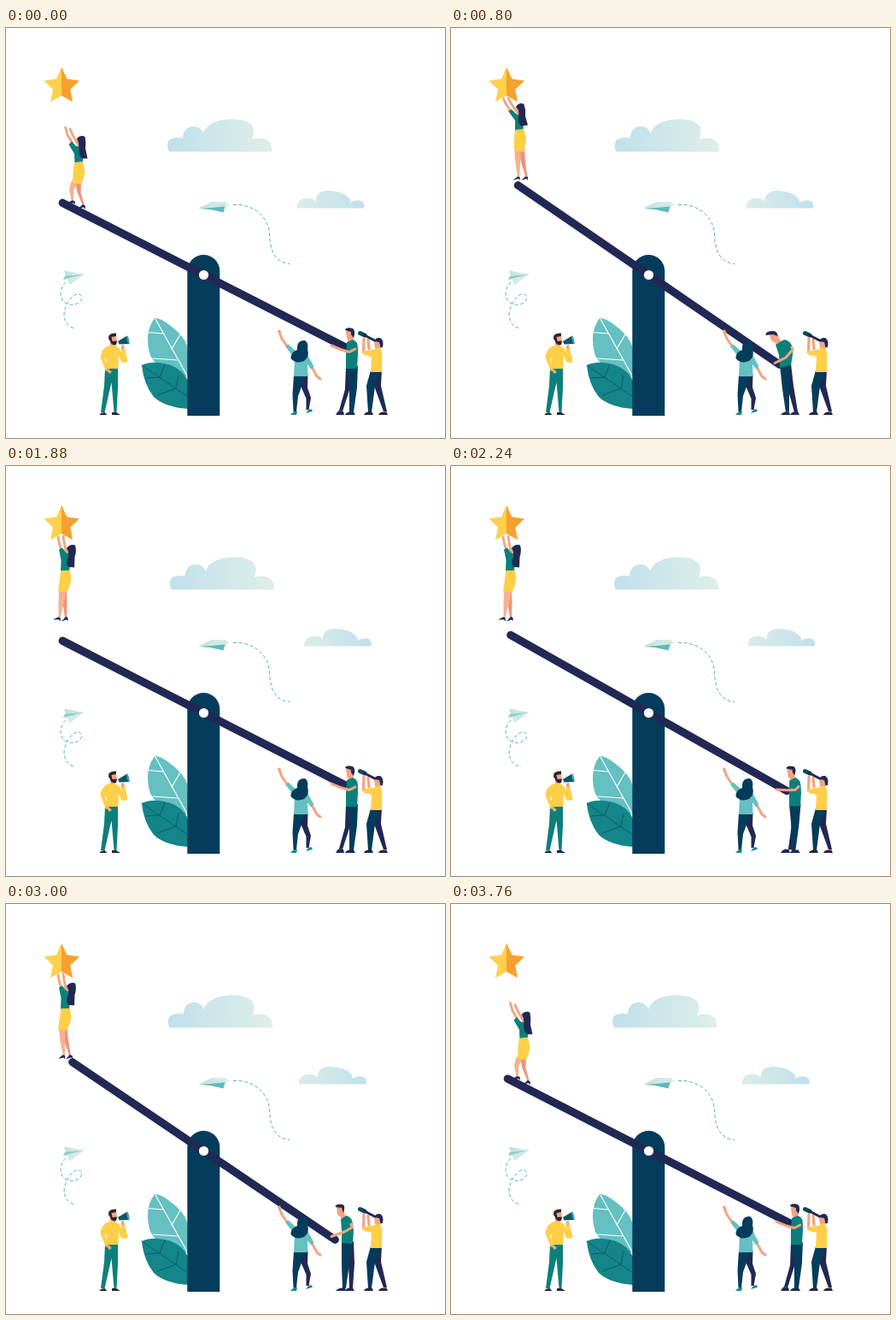
These frames come from a looping animation (514x479 px, 3800 ms). An HTML page:

```html
<!DOCTYPE html>
<html lang="en">
<head>
<meta charset="utf-8">
<title>Seesaw to the star</title>
<style>
html, body { margin: 0; width: 100%; height: 100%; overflow: hidden; background: #fff; }
svg { display: block; width: 100vw; height: 100vh; }
.line { fill: none; stroke-linecap: round; stroke-linejoin: round; }
.trail { fill: none; stroke: #55b7ba; stroke-width: 1; stroke-dasharray: 4 2.6; }
.navy { fill: #212854; } .deep { fill: #063c5b; } .green { fill: #0b807a; }
.aqua { fill: #64c0c1; } .gold { fill: #ffcf48; } .skin { fill: #f3a481; } .blush { fill: #f0927c; } .pale { fill: #f5b190; }
.dark { fill: #2d2432; }
.skinLine { stroke: #f3a481; }
</style>
</head>
<body>
<svg viewBox="0 0 514 479">
  <defs>
    <linearGradient id="sky"><stop stop-color="#c0e0eb"/><stop offset="1" stop-color="#dfeee8"/></linearGradient>
    <linearGradient id="sky2"><stop stop-color="#dbece8"/><stop offset="1" stop-color="#c0e0eb"/></linearGradient>
    <linearGradient id="wing"><stop stop-color="#b9dedf"/><stop offset="1" stop-color="#e6f1ec"/></linearGradient>
  </defs>

  <path id="cloud1" fill="url(#sky)" d="M191 144.500Q187 137 191 131Q197 126.500 207 128.500Q208 116 218 115Q228 114 231 123Q236 108 262 106.500Q289 106 290 120Q290 127 288 130Q303 126 309 134Q312 139 311 144.500Z"/>
  <path id="cloud2" fill="url(#sky2)" d="M340.300 210.500Q341 200 350 199Q359 198 362.500 203Q362 190 378 190Q396 191 402 199Q404 202 403 204Q411 199 418 203Q420 206 419.500 210.500Z"/>

  <path fill="#ffcf4e" d="M65 45.800L59 59.500L44.300 61.500L55 71.800L52 86.300L65 79Z"/>
  <path fill="#f7a02e" d="M65 45.800L71.300 59.500L86 61.500L75.300 71.800L78 86.300L65 79Z"/>

  <path fill="url(#wing)" d="M225.500 210.500L241 203L257 203L262 207L256 210L254 213Z"/>
  <path fill="#cfe7e5" d="M225.500 210.500L258 204L256 210Z"/>
  <path fill="#5dbabd" d="M226 211L240 210L256.500 208.500L254.500 215.500L239 212Z"/>
  <path class="trail" d="M266 206.500C289 205 307 220 308.500 240C309 259 314 274 332 275.500"/>

  <path fill="url(#wing)" d="M91.500 287.500L68 283.500L70 290L67 294L72 293L74.500 300Z"/>
  <path fill="#8accca" d="M91.500 287.500L69 290L67 294Z"/>
  <path fill="#d4e9e5" d="M91.500 287.500L71 293L74.500 300Z"/>
  <path class="trail" d="M70 297C62 304 61 320 74 323C85 325 92 316 87 311.500C80 307 69 322 68 334C68 344 73 350 82 351"/>

  <path class="aqua" d="M213 407Q181 404 169 383Q161 356 174 339Q182 338 200 354Q213 366 213 378Z"/>
  <path class="line" stroke="#fff" stroke-width="1.200" d="M175 340L212 406M184 357L166 355.500M204 358L194 375M201 388L172 386"/>
  <path fill="#148589" d="M159 394Q172 388 192 393.500Q208 400 213 412V445Q186 443 173 431Q161 416 159 394Z"/>
  <path class="line" stroke="#0a5f69" stroke-width="1" d="M159 394L213 431M180 408L186 393M180 408L164 409M199 421L202 406M199 421L177 429"/>

  <path class="deep" d="M212.300 453V284A19 19 0 0 1 250.300 284V453Z"/>
  <path id="beam" class="line" stroke="#212854" stroke-width="9.300" d="M46 288.500H417"/>
  <circle cx="231.500" cy="288.500" r="5.600" fill="#fff"/>

  <!-- man with megaphone -->
  <g>
    <path class="green" d="M116 397L131 397L131 420L129.500 449H126.500L123.500 414L115.500 449H111L115 418Z"/>
    <path class="dark" d="M109.500 452Q110 449.500 115.500 449L118.500 452ZM124 452V449H129L134 452Z"/>
    <path class="gold" d="M118 372L126 370L132 374L131.500 398H117L118 387L115.500 386L120 398L117 401L110.500 385Q111 376 118 372Z"/>
    <path class="line" stroke="#ffcf48" stroke-width="4.600" d="M131 376L137 388.500H140L137 376"/>
    <path class="skin" d="M117 399L120 398L124 402L121 404ZM134.500 375L135 371L138 370L139 375Z"/>
    <path class="skin" d="M122 360L129 359L130 366L128 371H122Z"/>
    <path class="dark" d="M120 363Q119 356 129 356.500L129 360L123.500 361L124.500 366L130 365.500L129 370Q123 371 122 366Z"/>
    <path fill="#0b5763" d="M131 366L142 359.500L144.500 369L132.500 369.500Z"/>
    <ellipse cx="142.800" cy="364.200" rx="1.300" ry="4.600" fill="#3aa1a5" transform="rotate(-14 142.800 364.200)"/>
  </g>

  <!-- woman pushing from below -->
  <g>
    <path class="line skinLine" stroke-width="3" d="M320 355L323 363L330 373M358 396L364 407L368 410"/>
    <path class="skin" d="M318 353L321 352.500L322.500 356L319.500 358Z"/>
    <path class="navy" d="M343 405H353.500L353 420L357 432L354.500 446H351.500L351.500 433L345 418Z"/>
    <path class="deep" d="M337 405H351L346 419L342 430L340 448H336.500L335.500 428Z"/>
    <path fill="#188a89" d="M333 452L337 448H341L340 452ZM351 450L354.500 445.500H358.500V448Z"/>
    <path class="aqua" d="M327 372L330.500 369.500L340 378L352 380L360.500 395.500L357 398.500L353 393L353.500 407H337L338 386Z"/>
    <path class="deep" d="M341 372Q342 364.500 350 365Q354.500 368 353 375Q356 384 349 389Q339 393 333.500 386Q333 379 341 376Z"/>
  </g>

  <!-- man with binoculars -->
  <g>
    <path class="navy" d="M430 400H440L439 418L446 448H442L431 418Z"/>
    <path class="deep" d="M427 400H439.500L432 419L428 449H424L422 418Z"/>
    <path class="dark" d="M419 452Q420 449 424 448.500H428.500L430 452ZM436 452Q437 449 441 448.500H445.500L447 452Z"/>
    <path class="skin" d="M431 366L439 366L440 373L436 377L432 374Z"/>
    <path class="navy" d="M431.500 366Q432 361.500 438 362Q443 365 441 373L438.500 373L437 367Z"/>
    <path class="line skinLine" stroke-width="3.200" d="M418.500 379L419 363M425 375L424 364"/>
    <path class="gold" d="M417 377.500L429 376L436 373.500Q440 375 440.500 381L440 402H427L428 384L419 382Z"/>
    <path class="line" stroke="#0d4b5c" stroke-width="5" stroke-linecap="butt" d="M414.500 356.500L420 359"/>
    <path class="line" stroke="#212854" stroke-width="3" stroke-linecap="butt" d="M419 358.500L431.500 365"/>
  </g>

  <g id="man"></g>
  <g id="girl"></g>
</svg>
<script>
const LOOP = 3800, PUMP = 1900;
const NS = 'http://www.w3.org/2000/svg';
const $ = id => document.getElementById(id);
const clamp = (x, lo, hi) => Math.min(hi, Math.max(lo, x));
const ease = x => (1 - Math.cos(Math.PI * x)) / 2;

// Each part: class, stroke width (0 = filled), then one path per pose.
const manParts = [
  ['navy', 0,
    'M398 395L407 395L403 420L394 448L390 447L397 422Z',
    'M400 394L407 394L408 420L406 449L402 449L401 420Z',
    'M390 394L398 392L401 418L406 448L402 449L394 420Z'],
  ['deep', 0,
    'M398 395L412 395L411 420L407 449L402 449L402 420Z',
    'M393 394L406 394L402 420L398 449L394 449L393 422Z',
    'M385 394L397 392L396 420L396 448L392 449L388 422Z'],
  ['navy', 0,
    'M386 452Q387 449 390 447L395 448L396 452ZM397 452Q398 449 402 448.5L407 448.5L409 452Z',
    'M386 452Q388 449 393 448.5L397 448.5L398 452ZM397 452Q398 449 401 448.5L406 448.5L408 452Z',
    'M386 452Q388 449 391 448.5L396 448.5L397 452ZM397 452Q398 449 401 448.5L406 448L408 452Z'],
  ['skin', 0,
    'M398 354L406 353L407 361L406 367L401 367L399 362Z',
    'M387 354L395 353L396 361L399 367L393 367L388 363Z',
    'M373 359L380 355L383 360L387 367L381 369L375 365Z'],
  ['navy', 0,
    'M397 353Q398 349 406 351Q410 354 407 362L404 358L404 355Z',
    'M385.500 354Q386 349.500 394 351Q398 352 395 361L394 358L393 355Z',
    'M368.500 359Q368 354 377 354Q381 353 383 360L380 359L377 358Z'],
  ['green', 0,
    'M399 367L406 364Q412 366 412 374L412 382L411 398L398 398L398 382Z',
    'M392 368L399 364Q405 366 406 374L407 382L406 397L393 396L393 382Z',
    'M380 370L390 364Q398 365 400 374L400 382L398 394L385 397L384 382Z'],
  ['skin line', 3,
    'M409 375L402 378.500L393 376L381 371',
    'M404 374L405 378L396 383L381 388.500',
    'M399 373L400 376L392 385L379 391.500'],
];

const girlParts = [
  ['skin line', 2.8,
    'M69.500 116L72 125L78 135', 'M61.500 83L65 90L71 98', 'M61 83L62.500 91L65 99'],
  ['skin line', 2.8,
    'M75 118L78 125L83 134', 'M67 82L71 89L76 97', 'M67 82L68 89L70 99'],
  ['blush', 0,
    'M81 180L88 180L87.500 192L92 208L90 208L83.500 192Z',
    'M79 142L86 142L87 157L89.500 174L87.500 174L82 157Z',
    'M65 145L72 145L74 160L79 177L77 177L70 161Z',
    'M64 145L71 145L71.500 160L71 177L69 177L66.500 161Z'],
  ['pale', 0,
    'M76.500 179L84 180L79 190L79 204L77 204L74 189Z',
    'M74 142L82 142L81 157L80 175L78 175L75.500 157Z',
    'M62 145L69 145L70 160L72.500 177L70.500 177L64.500 160Z',
    'M62 145L71 145L67.500 161L63.500 177L61.500 177L61.500 160Z'],
  ['navy', 0,
    'M85 210.500L90 206L93 208L92.500 212L91 209.500Z', 'M82 178L87 173.500L90 174L90 178L88.500 176Z',
    'M73 181.500L77.500 176L81 177.500L81.500 181L79.500 179Z', 'M65 181.500L70 176L72.500 177L72.500 181.500L71 179.500Z'],
  ['navy', 0,
    'M70 205.500L77 201.500L80.500 202L81 206L79 204.500Z', 'M72.500 178L78 173.500L80.500 174L81 178L79 176Z',
    'M65 181.500L70 176L72.500 177L72.500 181.500L71 179.500Z', 'M55 179.500L61 176.500L63.500 177L64 181.500L62 179.500Z'],
  ['skin', 0,
    'M81 130L86 128L89 139L84 139Z', 'M75 93L80 90L82 102L77 102Z', 'M70 96L76 94L76 103L70 104Z'],
  ['green', 0,
    'M73.500 136L77 132.500L82 138L88 139L90 148L90 158L80.500 158L80 147Z',
    'M67 97L71 95L77 101L83 102L85 110L84.500 120L75 120L75 108Z',
    'M62 97.500L66 95.500L70 101L74 103L75 112L74 123L64 123L64.500 110Z'],
  ['gold', 0,
    'M80 157L90 156L92.500 167Q91 178 87.500 182.500L77 181Q79 175 78.500 168Z',
    'M75 119L85 118L88 128Q87 139 85 144.500L74 143.500Q73.500 137 74 130Z',
    'M64.500 122L75 122L76.500 132Q75 141 71.500 147.500L61 146.500Q62 140 63 132Z'],
  ['navy', 0,
    'M83 129Q87 124.500 92.500 127Q94 134 93 141L95.500 152.500L89 152.500Q84 148 85.500 141L85 134Z',
    'M76 92Q80 86 85.500 89Q88 96 87 103L90 113.500L82 114.500Q77 110 79.500 102L79 96Z',
    'M71 96Q75 90.500 81 92.500Q83 99 80.500 106L80 118.500L73 118Q69.500 113 73 106L73 100Z'],
];

function build(id, parts) {
  return parts.map(([cls, width, ...poses]) => {
    const el = document.createElementNS(NS, 'path');
    const tone = cls.split(' ')[0];
    el.setAttribute('class', width ? 'line ' + tone + 'Line' : tone);
    if (width) el.setAttribute('stroke-width', width);
    $(id).append(el);
    return { el, poses, nums: poses.map(p => p.match(/[\d.]+/g).map(Number)) };
  });
}

// Blend neighbouring poses: 0 is the first, 1 the second, and so on.
function pose(parts, q) {
  for (const { el, poses, nums } of parts) {
    const last = nums.length - 1;
    const i = Math.min(Math.floor(q), last), j = Math.min(i + 1, last);
    const k = q - Math.floor(q);
    let n = 0;
    el.setAttribute('d', poses[0].replace(/[\d.]+/g, () => {
      const v = nums[i][n] + (nums[j][n] - nums[i][n]) * k;
      n++;
      return v.toFixed(2);
    }));
  }
}

function track(keys, t) {
  for (let i = 1; i < keys.length; i++) {
    const [t0, a] = keys[i - 1], [t1, b] = keys[i];
    if (t <= t1) return a + (b - a) * ease(clamp((t - t0) / (t1 - t0), 0, 1));
  }
  return keys[keys.length - 1][1];
}

const tilt = [[0, 27], [900, 34.6], [960, 34.6], [1150, 33.9], [1360, 33.8], [1890, 27]];
const hang = [[900, 1], [1250, 2], [1480, 2], [1680, 3], [2290, 3], [2620, 2], [2660, 2], [2850, 3], [3250, 1]];
const drift1 = [[0, 0], [1100, 3.2], [LOOP, 0]];
const drift2 = [[0, 0], [1500, 8.8], [LOOP, 0]];

const man = build('man', manParts), girl = build('girl', girlParts);

function draw(t) {
  const a = track(tilt, t % PUMP);
  $('beam').setAttribute('transform', `rotate(${a} 231.5 288.5)`);
  $('cloud1').setAttribute('transform', `translate(${track(drift1, t)} 0)`);
  $('cloud2').setAttribute('transform', `translate(${track(drift2, t)} 0)`);

  const lift = clamp((a - 27) / 5.9, 0, 1);
  pose(man, lift + clamp((a - 34.1) / 0.25, 0, 1));
  pose(girl, t < 900 || t > 3250 ? lift : track(hang, t));
}

let start;
function tick(now) {
  start ??= now;
  draw((now - start) % LOOP);
  requestAnimationFrame(tick);
}
draw(0);
requestAnimationFrame(tick);
</script>
</body>
</html>
```
